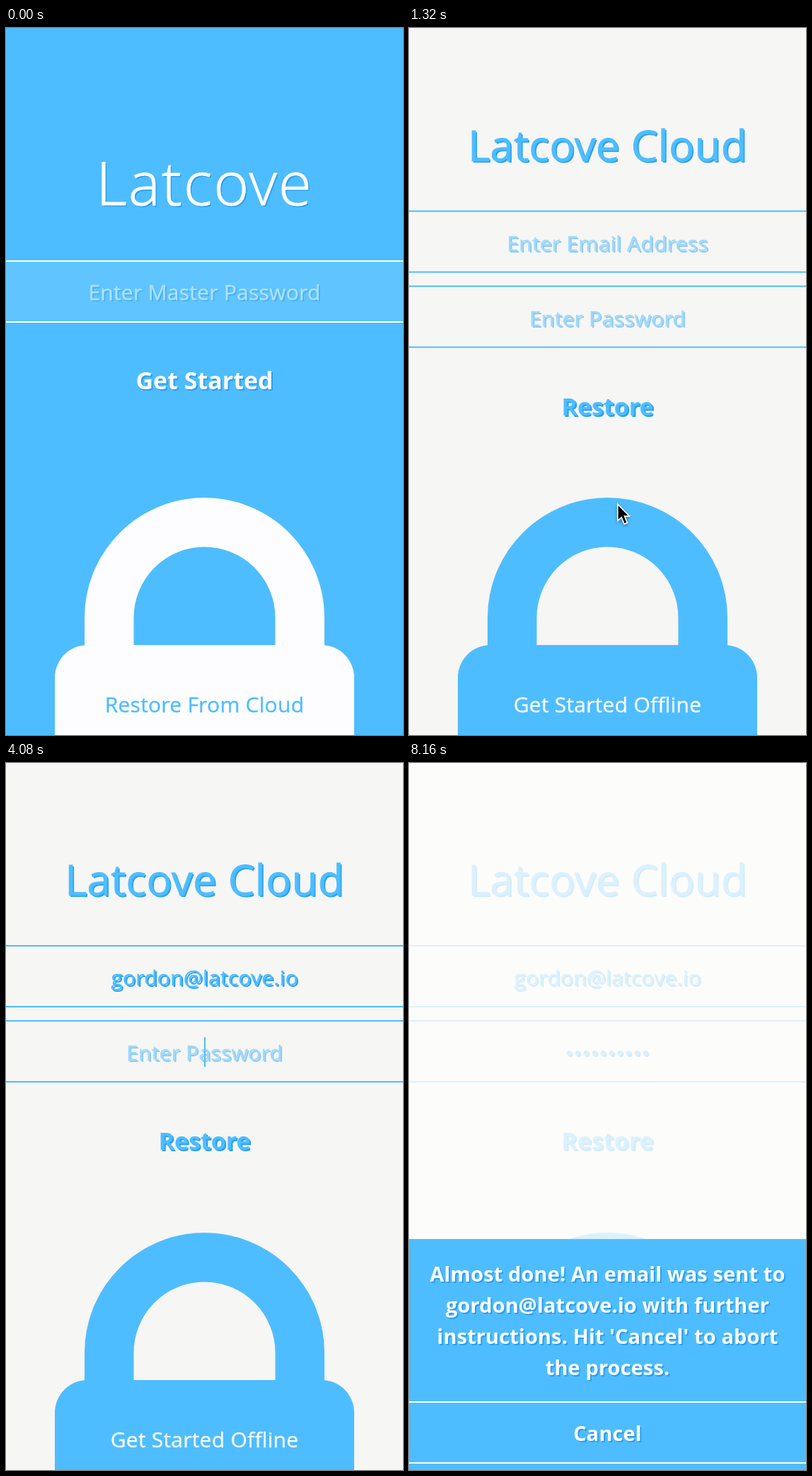
An HTML page for the animation above (8.22 s loop, 561 by 998 pixels).

```html
<!DOCTYPE html>
<html lang="en">
<head>
<meta charset="utf-8">
<title>Restore from cloud</title>
<style>
  :root { --blue: #4ebdff; --deep: #2a9ff0; --white: #fdfdff; }
  html, body { margin: 0; width: 100%; height: 100%; overflow: hidden; }
  body { font-family: "Open Sans", "Noto Sans", sans-serif; letter-spacing: .25px; }
  #stage { position: relative; width: 561px; height: 998px; overflow: hidden; background: var(--blue); }
  .layer { position: absolute; inset: 0; }
  #home { color: var(--white); }
  #cloud { color: var(--blue); background: #f6f6f4; }

  /* a line of text centred on --y */
  .text {
    position: absolute; left: 0; width: 100%; top: calc(var(--y) * 1px);
    height: 60px; margin-top: -30px; line-height: 60px; font-size: 30px;
    text-align: center; white-space: pre; text-shadow: 2px 2px 0 var(--deep);
    -webkit-text-stroke: .35px;
  }
  .plain { text-shadow: none; }
  .title { font-size: 60px; -webkit-text-stroke: .8px; }
  .hero { font-size: 85px; font-weight: 300; letter-spacing: 2.2px; -webkit-text-stroke: 1px; }
  .button { font-size: 34px; font-weight: 700; letter-spacing: 0; -webkit-text-stroke: 0; }
  .hint { opacity: .5; }
  .field {
    position: absolute; left: 0; width: 100%; top: calc(var(--y) * 1px); height: 84px;
    border: solid currentColor; border-width: 2px 0;
  }
  #home .field { background: rgba(255, 255, 255, .1); }
  .value { display: inline-block; position: relative; height: 60px; vertical-align: top; }
  .dots .value { letter-spacing: .7px; }
  .caret {
    position: absolute; left: 100%; top: 8px; width: 1.5px; height: 42px;
    margin-left: -.5px; background: var(--blue);
  }
  svg { position: absolute; left: 0; top: 0; overflow: visible; }

  #veil { background: #fefefd; }
  #strip { position: absolute; left: 0; bottom: 0; width: 100%; height: 13px; background: #fdfdfd; }
  #strip::before { content: ""; position: absolute; left: 0; bottom: 0; width: 528px; height: 12px; background: #d8d5d1; }
  #dialog {
    position: absolute; left: 0; top: 672px; width: 100%; height: 326px;
    background: var(--blue); color: var(--white); font-weight: 700;
  }
  #dialog .text { font-size: 29px; letter-spacing: .1px; -webkit-text-stroke: 0; }
  .rule { position: absolute; left: 0; width: 100%; top: calc(var(--y) * 1px); height: 2px; background: var(--white); }

  #arrow { filter: drop-shadow(0 2px 2px rgba(0, 0, 0, .35)); }
  #touch {
    position: absolute; left: -17px; top: -17px; width: 34px; height: 34px;
    border-radius: 50%; background: rgba(110, 110, 112, .82);
  }
</style>
</head>
<body>
<div id="stage">
  <div id="home" class="layer">
    <svg width="561" height="998" color="#fdfdff"><use href="#lock"/></svg>
    <div id="intro" class="layer">
      <div class="text hero" style="--y:217">Latcove</div>
      <div class="field" style="--y:328"></div>
      <div class="text hint" style="--y:373.4">Enter Master Password</div>
      <div class="text button" style="--y:496.8">Get Started</div>
    </div>
    <div id="restore" class="text plain" style="--y:955.4;color:var(--blue)">Restore From Cloud</div>
  </div>

  <div id="cloud" class="layer">
    <svg width="561" height="998">
      <g id="lock">
        <path d="M145.75 900V832.5a134.75 134.75 0 0 1 269.5 0V900" fill="none" stroke="currentColor" stroke-width="69.5"/>
        <rect x="69" y="871" width="423" height="200" rx="46" fill="currentColor"/>
      </g>
    </svg>
    <div id="form" class="layer">
      <div class="text title" style="--y:163.7">Latcove Cloud</div>
      <div class="field" style="--y:257"></div>
      <div class="field" style="--y:363"></div>
      <div id="emailHint" class="text hint" style="--y:303.4">Enter Email Address</div>
      <div class="text" style="--y:303.4"><span class="value"><span id="email"></span><i id="emailCaret" class="caret"></i></span></div>
      <div id="passHint" class="text hint" style="--y:409.4">Enter Password</div>
      <div class="text dots" style="--y:409.4"><span class="value"><span id="pass"></span><i id="passCaret" class="caret"></i></span></div>
      <div class="text button" style="--y:532.8">Restore</div>
    </div>
    <div class="text plain" style="--y:955.4;color:var(--white)">Get Started Offline</div>
  </div>

  <div id="veil" class="layer"></div>
  <div id="strip"></div>
  <div id="dialog">
    <div class="text" style="--y:48.6">Almost done! An email was sent to</div>
    <div class="text" style="--y:92.6">gordon@latcove.io with further</div>
    <div class="text" style="--y:136.6">instructions. Hit 'Cancel' to abort</div>
    <div class="text" style="--y:180.6">the process.</div>
    <div class="rule" style="--y:229"></div>
    <div class="text" style="--y:274.4">Cancel</div>
    <div class="rule" style="--y:315"></div>
  </div>

  <svg id="arrow" width="20" height="30">
    <path d="M0 0V23.5L5.4 18.6 9.3 28 13.6 26.2 9.7 17H16.8Z" stroke="#fff" stroke-width="1.6"/>
  </svg>
  <div id="touch"></div>
</div>

<script>
const LOOP = 8220, STEP = 60;
const EMAIL = "gordon@latcove.io", PASS = "•".repeat(10);
const $ = id => document.getElementById(id);

// steps of [time, value, value...]
const arrowPath = [[240, 330, 870], [600, 266, 944], [900, 264, 942], [1140, 273, 843], [1620, 342, 303]];
const touchPath = [[5580, 345, 425], [5940, 306, 517], [6120, 298, 538], [6540, 286, 558], [6900, 282, 566]];
const fade = [[900, 0], [1140, .8], [1260, 1]];
const introFade = [[900, 1], [1080, 0]];
const veilFade = [[6240, 0], [6540, .8]];
const dialogSlide = [[6240, 326], [6540, -13], [6720, 0]];

const linear = x => x;
const smooth = x => x * x * (3 - 2 * x);

function track(steps, t, ease = linear) {
  if (t <= steps[0][0]) return steps[0].slice(1);
  for (let i = 1; i < steps.length; i++) {
    const [a, ...from] = steps[i - 1], [b, ...to] = steps[i];
    if (t < b) {
      const k = ease((t - a) / (b - a));
      return from.map((v, j) => v + (to[j] - v) * k);
    }
  }
  return steps[steps.length - 1].slice(1);
}

const within = (t, a, b) => t >= a && t < b;
const show = (id, on) => { $(id).style.visibility = on ? "visible" : "hidden"; };
const move = (id, x, y) => { $(id).style.transform = `translate(${x}px, ${y}px)`; };

function type(id, text, t, start, gap) {
  const n = Math.floor((t - start) / gap) + 1;
  const shown = text.slice(0, Math.max(0, n));
  $(id).textContent = shown;
  show(id + "Hint", !shown);
}

// solid while typing, blinking otherwise
function caret(id, t, focus, typeStart, typeEnd, blur) {
  const since = t < typeStart ? t - focus : t - typeEnd;
  const lit = within(t, typeStart, typeEnd) || since % 1000 < 500;
  show(id, within(t, focus, blur) && lit);
}

function draw(t) {
  const gone = track(introFade, t)[0];
  $("intro").style.opacity = $("restore").style.opacity = gone;
  $("cloud").style.opacity = track(fade, t)[0];
  const slide = t < 900 ? 60 : 60 * Math.exp((900 - t) / 88);
  move("form", 0, slide < .3 ? 0 : slide);

  type("email", EMAIL, t, 2100, 78);
  type("pass", PASS, t, 4260, 96);
  caret("emailCaret", t, 1680, 2100, 3440, 3660);
  caret("passCaret", t, 3660, 4260, 4920, 6060);

  $("veil").style.opacity = track(veilFade, t)[0];
  const drop = track(dialogSlide, t, smooth)[0];
  move("dialog", 0, drop);
  show("dialog", t >= 6240);
  show("strip", drop < 0);

  move("arrow", ...track(arrowPath, t, smooth));
  show("arrow", within(t, 240, 2100));
  move("touch", ...track(touchPath, t));
  show("touch", within(t, 5580, 7440));
}

const begin = performance.now();
function tick() {
  const t = (performance.now() - begin) % LOOP;
  draw(Math.floor(t / STEP) * STEP);
  requestAnimationFrame(tick);
}
tick();
</script>
</body>
</html>
```
